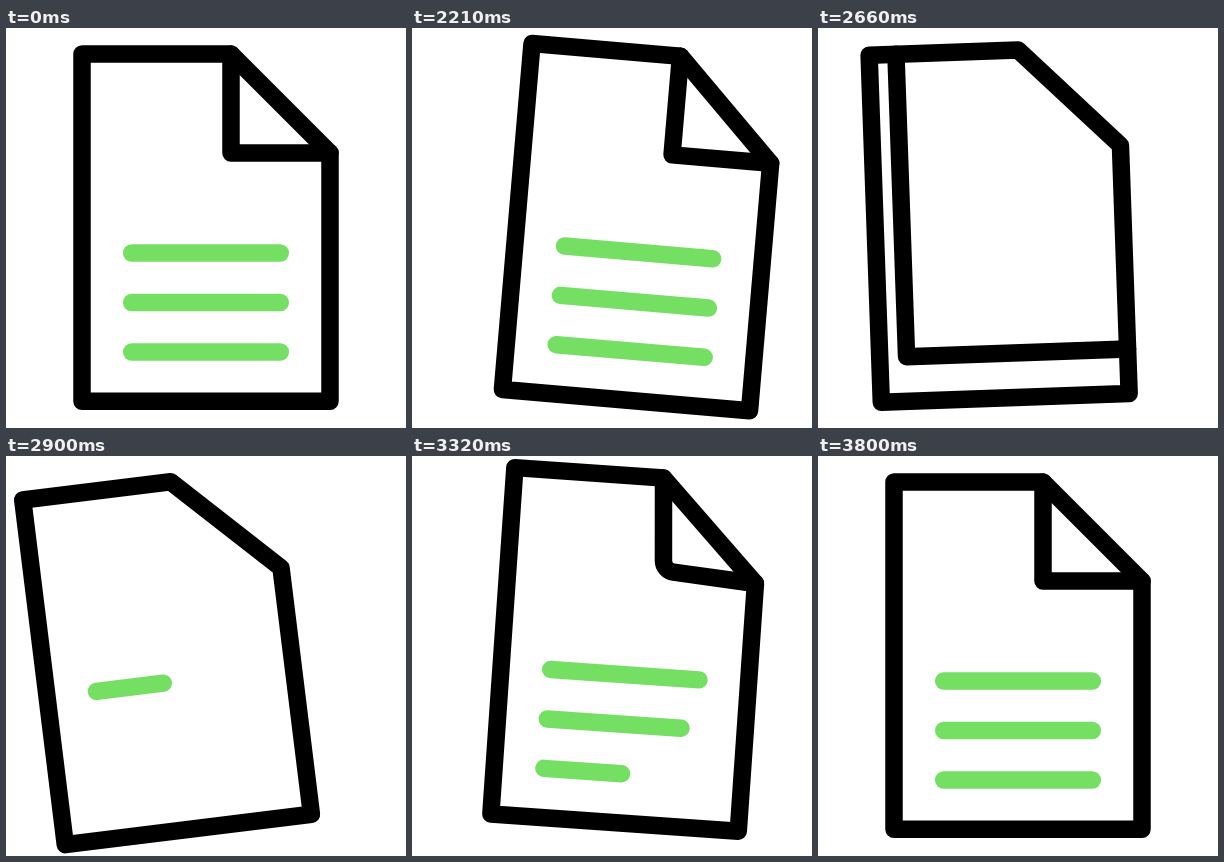
Animation of 400 by 400 pixels, one loop 3.83 s. Source, as an HTML page with a canvas:

```html
<!DOCTYPE html>
<html lang="en">
<head>
<meta charset="utf-8">
<title>Swinging page</title>
<style>
  html, body { margin: 0; width: 100%; height: 100%; overflow: hidden; background: #fff; }
  canvas { display: block; width: 100vmin; height: 100vmin; }
</style>
</head>
<body>
<canvas id="stage" width="400" height="400"></canvas>
<script>
const ctx = document.getElementById('stage').getContext('2d');
const LOOP = 3830;
const FLAP_START = 2400, FLAP_END = 2762;
const GREEN = '#75df63';
const L = 76, R = 324, T = 26, B = 373.3, FX = 225, FY = 125;

// [time, value] keys, eased between neighbours
const ANGLE = [[2000, 0], [2400, 9], [2820, -7.05], [2890, -7.05], [3410, 4.8], [3800, 0]];
const SHIFT_X = [[2000, 0], [2405, 54], [2775, -39], [2890, -39], [3360, 15.5], [3800, 0]];
const SHIFT_Y = [[2000, 0], [2400, -1], [2600, -4], [2850, 1.5], [2900, 1.5], [3390, -6.6], [3800, 0]];

const clamp = u => Math.min(1, Math.max(0, u));
const lerp = (a, b, u) => a + (b - a) * u;
const span = (t, start, end) => clamp((t - start) / (end - start));
const easeInOut = u => (1 - Math.cos(Math.PI * u)) / 2;
const easeOut = u => 1 - (1 - u) * (1 - u);

function track(keys, t) {
  if (t <= keys[0][0]) return keys[0][1];
  for (let i = 1; i < keys.length; i++) {
    const [t0, v0] = keys[i - 1], [t1, v1] = keys[i];
    if (t < t1) return lerp(v0, v1, easeInOut((t - t0) / (t1 - t0)));
  }
  return keys[keys.length - 1][1];
}

function trace(points, closed) {
  ctx.beginPath();
  points.forEach(([x, y]) => ctx.lineTo(x, y));
  if (closed) ctx.closePath();
}

function drawLines(t) {
  ctx.strokeStyle = GREEN;
  for (let i = 0; i < 3; i++) {
    const start = 2765 + i * 197;
    const grow = t < FLAP_END ? 1 : easeOut(span(t, start, start + 522));
    if (grow <= 0) continue;
    const y = 225 + i * 49.5;
    trace([[125.7, y], [125.7 + 148.6 * grow, y]]);
    ctx.stroke();
  }
}

// The flap slides over the whole sheet and hides the text
function drawFlap(t) {
  const u = easeInOut(span(t, FLAP_START, FLAP_END));
  const x = lerp(FX, L, u), y = lerp(FY, B, u);
  ctx.fillStyle = '#fff';
  trace([[x, T], [FX, T], [R, FY], [R, y], [x, y]], true);
  ctx.fill();
  trace([[x, T], [x, y], [R, y]]);
  ctx.stroke();
}

// A new corner bulges out of the diagonal edge
function drawNewFold(t) {
  const u = easeOut(span(t, 3000, 3500));
  if (u <= 0) return;
  const x = lerp((FX + R) / 2, FX, u), y = lerp((T + FY) / 2, FY, u);
  ctx.beginPath();
  ctx.moveTo(FX, T);
  ctx.arcTo(x, y, R, FY, 90 * (1 - u));
  ctx.lineTo(R, FY);
  ctx.stroke();
}

function draw(t) {
  ctx.setTransform(1, 0, 0, 1, 0, 0);
  ctx.fillStyle = '#fff';
  ctx.fillRect(0, 0, 400, 400);
  ctx.translate(200 + track(SHIFT_X, t), 199.6 + track(SHIFT_Y, t));
  ctx.rotate(track(ANGLE, t) * Math.PI / 180);
  ctx.translate(-200, -199.6);
  ctx.lineWidth = 17.5;
  ctx.lineCap = ctx.lineJoin = 'round';

  drawLines(t);
  ctx.strokeStyle = '#000';
  if (t < FLAP_END) drawFlap(t);
  else drawNewFold(t);
  trace([[L, T], [FX, T], [R, FY], [R, B], [L, B]], true);
  ctx.stroke();
}

const begin = performance.now();
function tick() {
  draw((performance.now() - begin) % LOOP);
  requestAnimationFrame(tick);
}
tick();
</script>
</body>
</html>
```
